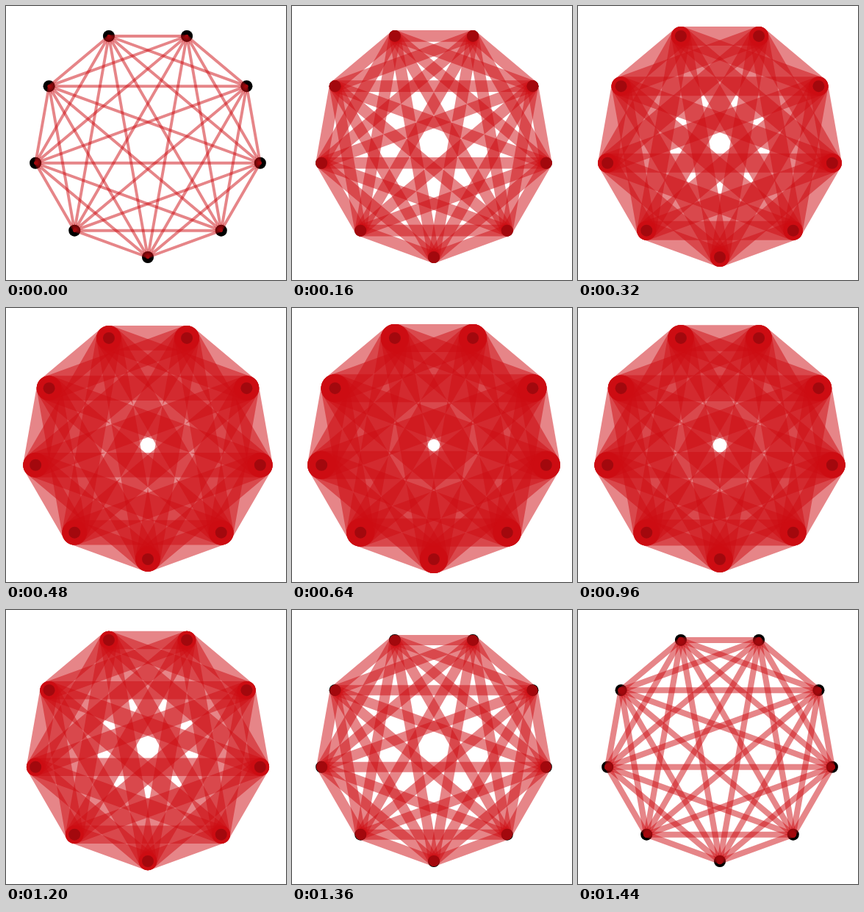
These frames come from a looping animation (381 px wide and 373 px high, 1520 ms). An HTML page with a canvas:

```html
<!DOCTYPE html>
<html lang="en">
<head>
<meta charset="utf-8">
<title>Complete graph</title>
<style>
  html, body { margin: 0; width: 100%; height: 100%; overflow: hidden; background: #fff; }
  canvas { display: block; }
</style>
</head>
<body>
<canvas id="stage" width="381" height="373"></canvas>
<script>
const ctx = document.getElementById('stage').getContext('2d');
const STEP = 80, STEPS = 19;
const N = 9, CX = 193, CY = 186.8, R = 155.2, DOT = 8;

const nodes = Array.from({ length: N }, (_, i) => {
  const a = Math.PI / 2 + i * 2 * Math.PI / N;
  return [CX + R * Math.cos(a), CY + R * Math.sin(a)];
});

function dots(color) {
  ctx.fillStyle = color;
  for (const [x, y] of nodes) {
    ctx.beginPath();
    ctx.arc(x, y, DOT, 0, 2 * Math.PI);
    ctx.fill();
  }
}

function edges(width) {
  ctx.strokeStyle = 'rgba(205, 12, 18, 0.5)';
  ctx.lineWidth = width;
  ctx.lineCap = 'round';
  for (let i = 0; i < N; i++) {
    for (let j = i + 1; j < N; j++) {
      ctx.beginPath();
      ctx.moveTo(...nodes[i]);
      ctx.lineTo(...nodes[j]);
      ctx.stroke();
    }
  }
}

function draw(step) {
  ctx.fillStyle = '#fff';
  ctx.fillRect(0, 0, 381, 373);
  dots('#000');
  edges(39 * Math.sin(0.1 + 0.1575 * step));
  dots('rgba(0, 0, 0, 0.2)'); // keeps the nodes darker than the edge caps
}

let start, last;
function tick(now) {
  start ??= now;
  const step = Math.floor((now - start) / STEP) % STEPS;
  if (step !== last) draw(last = step);
  requestAnimationFrame(tick);
}
draw(last = 0);
requestAnimationFrame(tick);
</script>
</body>
</html>
```
